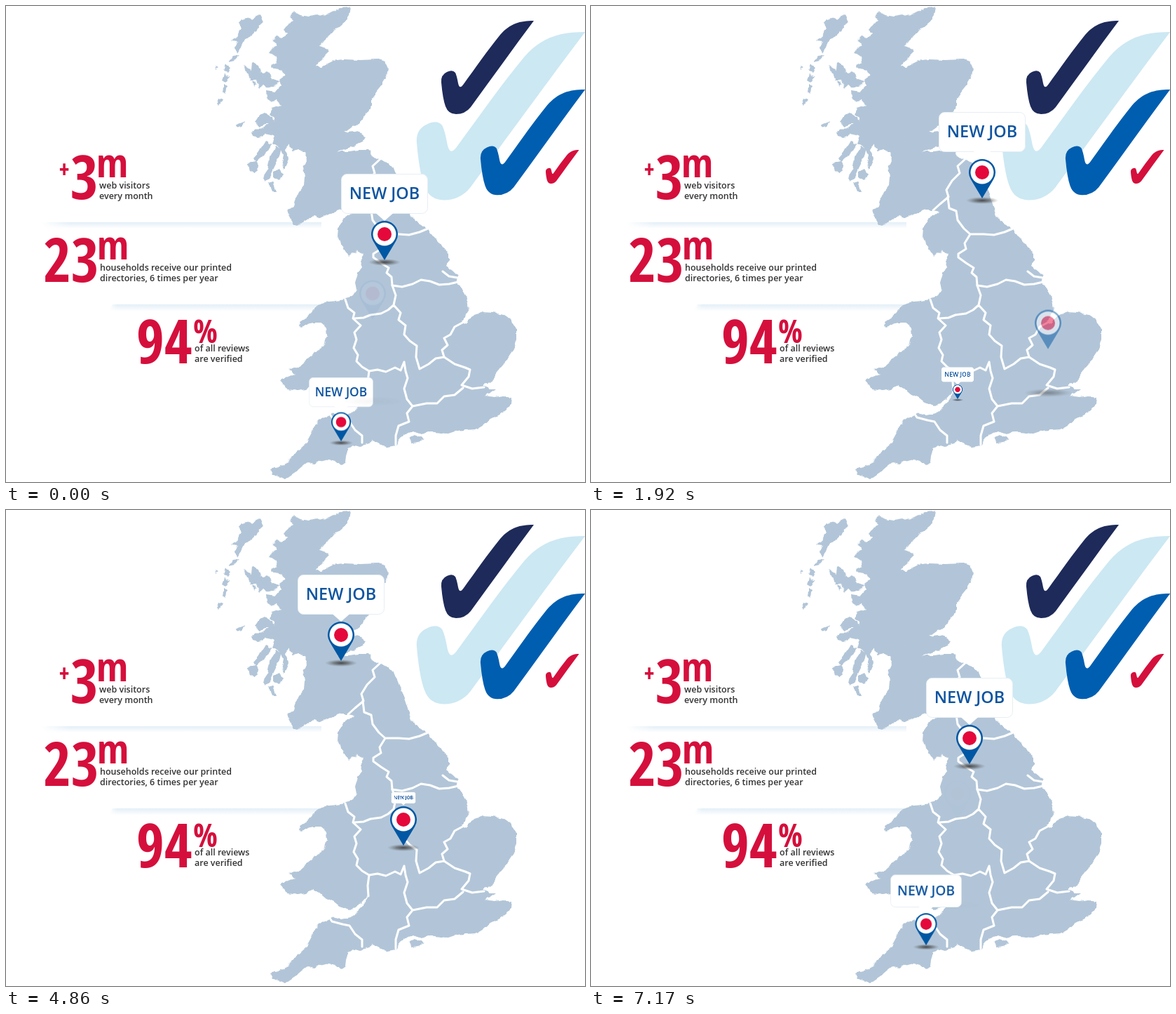
Write an HTML page that moves like this. It is 826 px wide and 678 px high and loops after 7200 ms.

```html
<!DOCTYPE html>
<html lang="en">
<head>
<meta charset="utf-8">
<title>New jobs map</title>
<style>
html, body { margin: 0; width: 100%; height: 100%; overflow: hidden; background: #fff; }
svg { display: block; width: 826px; height: 678px; font-family: "Open Sans", "Noto Sans", sans-serif; }
.land { fill: #b2c5d8; }
.borders { fill: none; stroke: #fff; stroke-width: 3; stroke-linejoin: round; stroke-linecap: round; }
.figure { fill: #d50f3c; font-family: "Open Sans Condensed", "Open Sans", "Noto Sans", sans-serif; font-weight: 700; font-stretch: 75%; }
.big { font-size: 86px; text-anchor: end; }
.unit { font-size: 58px; }
.note { fill: #333; font-size: 12.5px; font-weight: 600; }
.label text { fill: #0d54a0; font-size: 23.4px; font-weight: 600; text-anchor: middle; }

.pin, .marker, .shadow, .label {
  transform-origin: 0 0;
  animation: 7200ms cubic-bezier(.37, 0, .63, 1) var(--delay) infinite;
}
.pin { animation-name: leave; }
.marker { animation-name: drop; }
.shadow { animation-name: gather; transform-origin: 0 3px; }
.label { animation-name: pop; transform-origin: 0 -58px; }

@keyframes leave {
  0%, 24.306% { transform: scale(1); }
  31.25%, 100% { transform: scale(0); }
}
@keyframes drop {
  0%, .972% { transform: translateY(var(--drop)); opacity: 0; }
  5.694%, 100% { transform: translateY(0); opacity: 1; }
}
@keyframes gather {
  0%, .972% { transform: scale(2, 1.4); opacity: 0; }
  5.694%, 100% { transform: scale(1); opacity: 1; }
}
@keyframes pop {
  0%, 5.694% { transform: scale(0); }
  8.472%, 100% { transform: scale(1); }
}
</style>
</head>
<body>
<svg viewBox="0 0 826 678">
  <defs>
    <linearGradient id="fade" x2="0" y2="1">
      <stop offset="0" stop-color="#e3eff7"/>
      <stop offset="1" stop-color="#fff"/>
    </linearGradient>
    <linearGradient id="edge">
      <stop offset="0" stop-color="#fff"/>
      <stop offset="1" stop-color="#fff" stop-opacity="0"/>
    </linearGradient>
    <radialGradient id="shade">
      <stop offset="0" stop-color="#333" stop-opacity=".85"/>
      <stop offset=".45" stop-color="#444" stop-opacity=".55"/>
      <stop offset="1" stop-color="#666" stop-opacity="0"/>
    </radialGradient>
    <filter id="coast" x="0" y="0" width="826" height="678" filterUnits="userSpaceOnUse" color-interpolation-filters="sRGB">
      <feTurbulence type="fractalNoise" baseFrequency=".1" numOctaves="2" seed="4"/>
      <feDisplacementMap in="SourceGraphic" scale="6" xChannelSelector="R" yChannelSelector="G"/>
    </filter>
    <path id="tick" d="M132 0C112 0 98 4 84 20C66 42 48 68 32 90Q26 99 24 89Q22 78 20 74Q16 69 8 73Q-1 77 0 88Q2 111 6 122Q10 133 21 133Q34 133 42 123C72 82 102 40 132 0Z"/>
  </defs>

  <g>
    <path fill="url(#fade)" d="M50 308H450V317H58Z"/>
    <path fill="url(#edge)" d="M50 307h40v11H50Z"/>
    <path fill="url(#fade)" d="M152 425H470V435H146Z"/>
    <path fill="url(#edge)" d="M145 424h14v12H145Z"/>
  </g>

  <g class="land" filter="url(#coast)">
    <!-- Scotland -->
    <path d="M410 8L420 13 432 15 450 12 462 10 476 3 492 2 490 12 483 22 470 33 462 42 452 50 447 57 458 60 462 64 452 74 444 84 450 88 458 82 466 78 482 76 505 77 530 76 541 79 545 88 543 100 536 112 528 122 522 132 522 142 515 152 508 162 500 170 490 174 482 180 495 178 508 181 514 186 508 194 495 200 484 204 470 208 460 214 400 170 378 168 384 160 376 154 380 146 392 142 385 134 378 130 385 120 392 112 390 104 398 100 394 92 382 90 378 84 388 80 385 72 376 66 380 60 388 56 380 50 386 44 394 46 402 40 396 34 402 26 410 22 404 14Z"/>
    <path d="M400 160L470 207 490 207 503 205 516 205 523 212 533 219 546 224 553 232 560 250 520 290 496 292 488 290 478 290 466 294 458 298 450 302 440 298 434 304 424 306 416 314 410 312 405 300 402 290 408 288 412 278 418 265 425 256 426 244 424 230 430 216 426 208 416 204 408 207 404 197 399 204 403 218 397 232 393 226 396 212 390 202 380 195 384 186 372 182 360 188 352 186 350 180 366 172 378 166Z"/>
    <!-- Northern England and the east -->
    <path d="M546 224L558 242 566 262 572 280 577 296 582 306 592 312 602 318 610 328 618 337 625 346 632 352 632 362 628 370 638 378 646 386 643 394 650 402 656 412 659 424 660 434 650 448 654 453 662 446 668 440 680 436 695 437 710 440 722 448 728 460 728 475 724 488 717 498 712 508 705 516 699 524 694 532 688 538 640 545 500 500 480 450 484 418 495 412 500 404 498 394 502 380 508 372 505 362 510 354 503 348 495 352 489 357 484 348 478 340 473 328 474 316 480 306 488 298 496 292 515 250Z"/>
    <!-- Wales -->
    <path d="M530 430L493 420 484 418 470 420 455 422 445 425 438 434 430 443 419 450 421 458 430 454 440 452 450 452 457 460 458 470 455 480 448 488 434 500 420 512 404 519 412 524 400 528 391 533 402 546 416 548 428 546 438 540 446 545 456 553 468 558 478 566 488 570 500 566 508 558 516 549 540 530Z"/>
    <!-- The south -->
    <path d="M516 552L508 564 500 572 492 580 478 583 466 580 458 584 448 588 440 596 438 606 432 617 425 626 416 634 408 642 402 650 390 656 376 659 380 667 388 670 398 674 405 669 414 663 422 656 430 650 440 652 448 648 460 645 469 648 477 655 484 650 485 640 488 630 495 625 505 628 512 624 524 620 533 624 545 628 556 626 562 616 572 608 582 605 592 610 601 606 612 607 628 609 640 605 655 604 668 603 680 598 690 589 700 584 712 577 720 567 721 558 710 556 696 558 682 556 690 552 700 545 690 545 680 541 688 536 640 480 500 490Z"/>
    <path d="M574 615L584 612 598 617 588 621 579 622Z"/>
    <!-- Western isles -->
    <path d="M361 12L366 22 358 34 350 42 341 47 337 56 330 67 326 60 331 51 321 50 330 42 335 31 332 22 345 17 352 20ZM324 71L334 70 326 78 317 80ZM313 83L320 88 316 94 310 92ZM312 97L320 101 314 108 309 105ZM311 112L316 115 313 125 309 122ZM304 131L309 133 304 142 301 139ZM298 86L302 88 299 90Z"/>
    <path d="M339 85L350 91 351 80 360 84 364 96 374 94 381 104 390 107 384 114 376 117 367 113 362 118 358 106 350 106 344 98ZM371 120L384 122 389 134 380 136 372 131ZM352 107L358 110 354 114ZM361 156L369 152 380 158 382 168 370 168 360 172 356 164ZM328 169L341 164 335 171 329 173Z"/>
    <path d="M370 192L380 196 374 206 364 216 356 222 352 216 362 205ZM345 225L356 221 360 229 355 238 347 234ZM384 199L393 204 388 218 381 232 376 244 369 250 366 244 374 232 377 216ZM382 236L390 232 395 240 389 247 382 244ZM374 252L381 250 386 264 379 264Z"/>
  </g>

  <g class="borders">
    <path d="M535 217L523 228 526 238 515 249 507 262 510 272 498 282 488 291M509 272L511 288 521 292 523 305 532 317 541 325 560 325 575 326 590 322 602 317M541 325L533 338 535 346 524 353 524 358 535 366 546 373 543 380 550 386 551 398 565 400 580 396 592 390 605 392 618 397 632 396 645 393M623 378L632 385 644 387"/>
    <path d="M551 398L556 412 553 426 545 433 535 438 520 440 510 444 497 445M553 426L563 437 560 447 570 455 568 468 576 477 586 484 585 500 590 517 603 510 613 502 625 500 622 490 630 483 625 473 634 468 640 457 655 449 660 438M484 418L488 430 497 437 495 445 506 455 497 465 500 475 496 487 502 497 500 506 508 514 518 520 516 535 517 550"/>
    <path d="M518 520L530 518 542 521 555 515 563 519 568 507 570 520 573 530 568 545 572 560 580 570 572 580 575 592 560 598 556 612 556 625M625 500L640 510 655 515 662 518 660 528 650 540 665 545 682 543M580 570L600 566 615 566 625 556 640 554 652 544M461 580L465 586 480 590 490 592 498 604 508 612 508 622"/>
  </g>

  <use href="#tick" fill="#cce8f3" transform="translate(586 37) scale(1.82 1.8)"/>
  <use href="#tick" fill="#1e2a59" transform="translate(621 21)"/>
  <use href="#tick" fill="#005eb0" transform="translate(677 119) scale(1.13)"/>
  <use href="#tick" fill="#d50f3c" transform="translate(770 205) scale(.36)"/>

  <g class="figure">
    <text x="75" y="245" font-size="36">+</text>
    <text class="big" x="131.5" y="275">3</text>
    <text class="unit" x="129" y="244">m</text>
    <text class="big" x="132.5" y="393">23</text>
    <text class="unit" x="130" y="361">m</text>
    <text class="big" x="265.5" y="508.500">94</text>
    <text x="267" y="480" font-size="46">%</text>
  </g>
  <g class="note">
    <text x="133" y="259.500">web visitors</text>
    <text x="133" y="274.500">every month</text>
    <text x="134" y="376.500">households receive our printed</text>
    <text x="134" y="391.500">directories, 6 times per year</text>
    <text x="269" y="492">of all reviews</text>
    <text x="269" y="507">are verified</text>
  </g>
  <g id="pins"></g>
</svg>
<script>
// Tip position and drop height, in order of arrival.
const pins = [
  [558, 274, 70], [652, 548, 120], [462, 543, 120], [478, 215, 120],
  [567, 478, 120], [478, 620, 120], [540, 362, 120], [523, 560, 120]
];
const LOOP = 7200, FIRST = 780, STEP = 900;

const pinMarkup = ([x, y, drop], i) => `
  <g transform="translate(${x} ${y})" style="--delay:${FIRST + STEP * i - LOOP}ms;--drop:${-drop}px">
    <g class="pin">
      <ellipse class="shadow" cy="3" rx="23" ry="5" fill="url(#shade)"/>
      <g class="label">
        <rect x="-61.5" y="-122.5" width="123" height="56" rx="8" fill="#fff" stroke="#e6eef5"/>
        <path d="M-13 -67.500H13L0 -56Z" fill="#fff"/>
        <text y="-87">NEW JOB</text>
      </g>
      <g class="marker">
        <path d="M0 0L-16.300 -27.200A19 19 0 1 1 16.300 -27.200Z" fill="#0057a3"/>
        <circle cy="-37" r="16.500" fill="#fff"/>
        <circle cy="-37" r="10" fill="#e4093a"/>
      </g>
    </g>
  </g>`;

document.getElementById("pins").innerHTML = pins.map(pinMarkup).join("");
</script>
</body>
</html>
```
